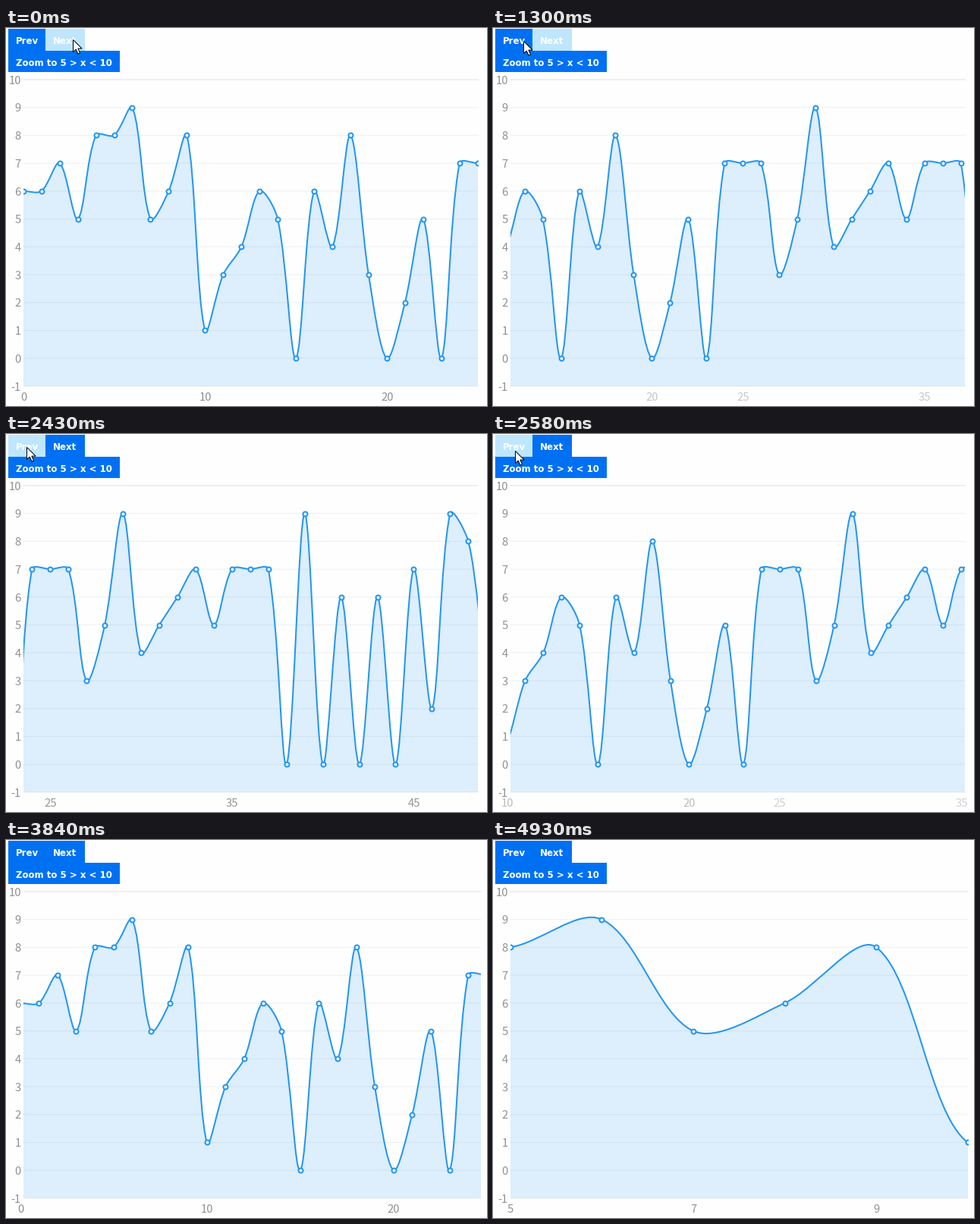
These frames come from a looping animation (634x498 px, 5.4 s). A matplotlib script:

```python
import numpy as np
import matplotlib.pyplot as plt
from matplotlib.animation import FuncAnimation
from matplotlib.patches import PathPatch, Polygon, Rectangle
from matplotlib.path import Path

W, H, DPI = 634, 498, 100
PX = 72 / DPI                       # points per pixel
LOOP, STEP = 5400, 20

BACK, BLUE = "#fefefe", "#2196f3"
IDLE, HOVER, PRESSED = "#0070f3", "#bee6fd", "#c4e5f6"
LABEL = "#919191"

LEFT, TOP, ROW = 22.7, 67.9, 36.73
SMOOTH = 0.65
DATA = [int(c) for c in "667588956813465064830250"
                        "777359456757770906060729848"]

# (first value, last value, right edge, tick labels)
VIEWS = [(0, 25, 621.7, (0, 10, 20)),
         (25, 50, 621.7, (25, 35, 45)),
         (0, 25, 621.7, (0, 10, 20)),
         (5, 10, 625.7, (5, 7, 9))]
MOVES = [1153.5, 2402.2, 3818]      # start of each transition
MOVE_MS = 300

CURSOR_T = [0, 1080, 1300, 1480, 2430, 2580, 2660, 2860, 3580, 3620, 3800]
CURSOR_X = [88, 88, 40, 27, 27, 29, 33, 59, 59, 58, 48]
CURSOR_Y = [15, 15, 17, 17, 17, 22, 25, 44, 44, 40, -24]
ARROW = np.array([(0, 0), (0, 16), (3.8, 12.6), (6.4, 18.6), (9, 17.5),
                  (6.4, 11.6), (11.6, 11.6)])

# (until, button, colour)
STATES = [(1340, "Next", HOVER), (2700, "Prev", HOVER),
          (2820, "Zoom", HOVER), (3580, "Zoom", PRESSED),
          (3660, "Zoom", HOVER), (3740, "Prev", HOVER)]


def to_x(value, view):
    lo, hi, right, _ = view
    return LEFT + (value - lo) * (right - LEFT) / (hi - lo)


def to_y(value):
    return TOP + (10 - value) * ROW


def curve(view):
    """Bezier vertices of the smoothed line; every third one is a data point."""
    p = np.column_stack([to_x(np.arange(len(DATA)), view),
                         to_y(np.array(DATA))])
    padded = np.vstack([p[:1], p, p[-1:]])
    mid = (padded[1:] + padded[:-1]) / 2
    size = np.hypot(*np.diff(padded, axis=0).T)
    k = (size[:-1] / (size[:-1] + size[1:]))[:, None]
    pivot = mid[:-1] + (mid[1:] - mid[:-1]) * k
    before = p + (mid[:-1] - pivot) * SMOOTH
    after = p + (mid[1:] - pivot) * SMOOTH
    return np.stack([before, p, after], axis=1).reshape(-1, 2)[1:-1]


CURVES = [curve(v) for v in VIEWS]
CODES = [Path.MOVETO] + [Path.CURVE4] * (len(CURVES[0]) - 1)

fig = plt.figure(figsize=(W / 100, H / 100), dpi=DPI, facecolor=BACK)
ax = fig.add_axes([0, 0, 1, 1])
ax.set_xlim(0, W)
ax.set_ylim(H, 0)
ax.axis("off")


def axis_text(x, y, value, align):
    return ax.text(x, y, str(value), ha=align, va="baseline", color=LABEL,
                   family="Noto Sans CJK JP", size=14.8 * PX, zorder=5)


def button(x0, y0, x1, y1, caption):
    box = Rectangle((x0, y0), x1 - x0, y1 - y0, fc=IDLE, lw=0, zorder=6)
    ax.add_patch(box)
    ax.text(x0 + 9.9, y0 + 20.4, caption, color="white", weight="bold",
            family="DejaVu Sans", size=11.75 * PX, va="baseline", zorder=7)
    return box


grid = []
for v in range(-1, 11):
    top = v == 10
    grid += ax.plot([LEFT, 622], [to_y(v)] * 2, zorder=1, snap=False,
                    color="#ebebeb" if top else "#f0f0f0",
                    lw=(1.5 if top else 1) * PX)
    axis_text(19.8, to_y(v) + 5.7, v, "right")

ticks = {v: axis_text(0, 491, v, "center")
         for v in sorted({v for view in VIEWS for v in view[3]})}

fill = PathPatch(Path(CURVES[0], CODES), fc=BLUE, alpha=0.15, lw=0, zorder=2)
line = PathPatch(Path(CURVES[0], CODES), fc="none", ec=BLUE, lw=2 * PX,
                 zorder=3)
ax.add_patch(fill)
ax.add_patch(line)
dots, = ax.plot([], [], "o", ms=6 * PX, mfc="white", mec=BLUE, mew=2 * PX,
                snap=False, zorder=4)

buttons = {"Prev": button(3, 1, 52, 30, "Prev"),
           "Next": button(52, 1, 104, 30, "Next"),
           "Zoom": button(3, 30, 150, 58, "Zoom to 5 > x < 10")}

cursor = Polygon(ARROW, closed=True, fc="white", ec="black", lw=1 * PX,
                 zorder=9)
ax.add_patch(cursor)


def stage(t):
    """Index of the current transition and its progress."""
    i = max(sum(t >= m for m in MOVES) - 1, 0)
    return i, min(max((t - MOVES[i]) / MOVE_MS, 0), 1)


def draw_chart(t):
    i, p = stage(t)
    old, new = VIEWS[i], VIEWS[i + 1]
    verts = CURVES[i] * (1 - p) + CURVES[i + 1] * p

    base = to_y(-1)
    corners = [(verts[-1, 0], base), (verts[0, 0], base)]
    fill.set_path(Path(np.vstack([verts, corners]),
                       CODES + [Path.LINETO] * 2))
    line.set_path(Path(verts, CODES))
    dots.set_data(*verts[::3].T)

    right = round((new if p > 0 else old)[2])
    window = Rectangle((23, 0), right - 23, H, transform=ax.transData)
    for artist in (fill, line, dots):
        artist.set_clip_path(window)
    for g in grid:
        g.set_xdata([23, right])

    for v, label in ticks.items():
        x = to_x(v, old) * (1 - p) + to_x(v, new) * p
        alpha = (v in old[3]) * (1 - p) + (v in new[3]) * p
        label.set_x(x + 0.3)
        label.set_alpha(alpha)
        label.set_visible(alpha > 0 and -20 < x < W + 20)


def draw_pointer(t):
    for box in buttons.values():
        box.set_facecolor(IDLE)
    for until, name, colour in STATES:
        if t < until:
            buttons[name].set_facecolor(colour)
            break
    tip = np.array([np.interp(t, CURSOR_T, CURSOR_X),
                    np.interp(t, CURSOR_T, CURSOR_Y)])
    cursor.set_xy(ARROW + np.floor(tip + 0.5) + 0.5)


def update(i):
    t = (i * STEP - 20) // 40 * 40 + 20     # the screen refreshes every 40 ms
    draw_chart(t)
    draw_pointer(t)
    return []


anim = FuncAnimation(fig, update, frames=LOOP // STEP, interval=STEP,
                     init_func=lambda: update(0), repeat=True,
                     repeat_delay=0, blit=False)
plt.show()
```
